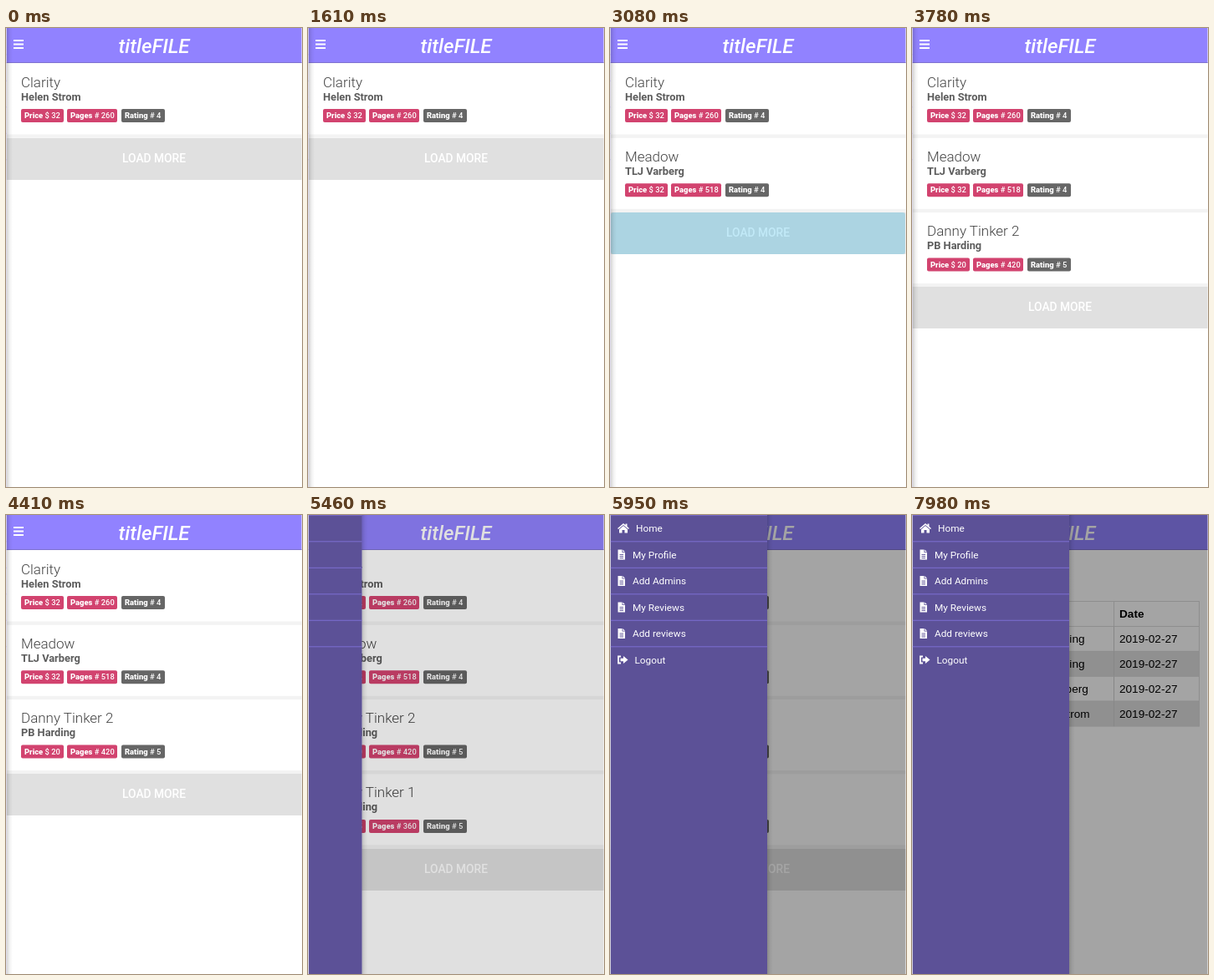
Animation of 354 by 550 pixels, one loop 8 s. Source, as an HTML page:

```html
<!DOCTYPE html>
<html lang="en">
<head>
<meta charset="utf-8">
<title>Book list</title>
<style>
  html, body { margin: 0; width: 100%; height: 100%; overflow: hidden; background: #fff; }
  svg { display: block; font-family: Roboto, sans-serif; }
  .brand { font: italic 500 24px Roboto, sans-serif; fill: #fff; text-anchor: middle; }
  .title { font-size: 17px; font-weight: 300; fill: #444; }
  .author { font-size: 12.8px; font-weight: 700; fill: #5c5c5c; }
  .badge { font-size: 9.4px; font-weight: 500; fill: #fff; }
  .badge tspan { font-weight: 800; }
  .more { font-size: 13.8px; font-weight: 500; fill: #fff; text-anchor: middle; }
  .table { font: 13.6px "Liberation Sans", Arial, sans-serif; }
  .table .head { font-weight: 700; }
  .nav text { font-size: 11.8px; fill: #fff; }
</style>
</head>
<body>
<svg width="354" height="550" viewBox="0 0 354 550">
  <defs>
    <clipPath id="screen"><path d="M.8 0H353.5V550H.8z"/></clipPath>
    <linearGradient id="shade">
      <stop offset="0" stop-opacity=".16"/>
      <stop offset=".5" stop-opacity=".05"/>
      <stop offset="1" stop-opacity="0"/>
    </linearGradient>
  </defs>
  <g clip-path="url(#screen)">
    <g id="shelf">
      <g id="cards"></g>
      <g id="button">
        <rect width="354" height="50" fill="#e0e0e0"/>
        <text class="more" x="177" y="29">LOAD MORE</text>
        <rect id="tap" x="1" width="352" height="50" rx="3" fill="#33b5e5"/>
      </g>
    </g>
    <g id="reviews" class="table">
      <path d="M130 103.5H344M130 133.5H344M241.5 103V134M343.5 103V134" stroke="#dcdcdc" fill="none"/>
      <text class="head" x="137" y="123">Author</text>
      <text class="head" x="248" y="123">Date</text>
      <g id="rows"></g>
    </g>
    <path d="M0 0H354V42H0z" fill="#9182ff"/>
    <path d="M0 41.5H354" stroke="#7f73cf"/>
    <path d="M9 15H21M9 19.5H21M9 24H21" stroke="#fff" stroke-width="2"/>
    <text class="brand" x="177" y="30">titleFILE</text>
    <rect id="dim" width="354" height="550"/>
    <g id="nav" class="nav">
      <path d="M188 0H195V550H188z" fill="url(#shade)"/>
      <path d="M0 0H188V550H0z" fill="#5c5197"/>
    </g>
  </g>
</svg>
<script>
const LOOP = 8000, PITCH = 89.3, NAV_WIDTH = 187;
const TAPS = [1680, 3080, 4200], LOADS = [2100, 3360, 4620];
const NAV_OPEN = 5397, NAV_TIME = 300, PAGE_AT = 6300, ROWS_AT = 7070;

const el = id => document.getElementById(id);
const clamp = v => Math.min(1, Math.max(0, v));
const show = (node, on) => node.setAttribute('visibility', on ? 'visible' : 'hidden');

const books = [
  ['Clarity', 'Helen Strom', 32, 260, 4],
  ['Meadow', 'TLJ Varberg', 32, 518, 4],
  ['Danny Tinker 2', 'PB Harding', 20, 420, 5],
  ['Danny Tinker 1', 'PB Harding', 25, 360, 5],
];

const badge = (x, width, fill, label, value) =>
  `<rect x="${x}" y="54.5" width="${width}" height="16" rx="2" fill="${fill}"/>
   <text class="badge" x="${x + 4}" y="65.6"><tspan>${label}</tspan> ${value}</text>`;

el('cards').innerHTML = books.map(([title, author, price, pages, rating], i) =>
  `<g transform="translate(0 ${42.5 + i * PITCH})">
    <rect y="85" width="354" height="4.3" fill="#f3f3f3"/>
    <text class="title" x="18" y="28">${title}</text>
    <text class="author" x="18" y="44">${author}</text>
    ${badge(18, 51, '#d2436f', 'Price', '$ ' + price)}
    ${badge(73, 60, '#d2436f', 'Pages', '# ' + pages)}
    ${badge(138, 52, '#666', 'Rating', '# ' + rating)}
  </g>`).join('');

el('rows').innerHTML = [3, 2, 1, 0].map((book, i) => {
  const y = 133.5 + i * 29.9;
  return `<rect x="120" y="${y}" width="223.5" height="29.9" stroke="#dcdcdc" fill="${i % 2 ? '#dfdfdf' : '#fff'}"/>
    <path d="M241.5 ${y}v29.9" stroke="#d2d2d2"/>
    <text x="137" y="${y + 19.5}">${books[book][1]}</text>
    <text x="248" y="${y + 19.5}">2019-02-27</text>`;
}).join('');

// Icons are centred vertically on y = 0
const home = '<path d="M9 0L16 -6L18.5 -3.9V-5.5H20.5V-2.2L23 0L22 1L16 -4L10 1zM11 1.2L16 -2.9L21 1.2V5.5H17.5V2H14.5V5.5H11z" fill="#fff"/>';
const file = '<path d="M9.5 -6H14.5V-2.5H18V6H9.5zM15.3 -6L18 -3.3H15.3z" fill="#fff"/><path d="M11.5 0H16M11.5 2H16M11.5 4H16" stroke="#5c5197" stroke-width=".9"/>';
const exit = '<path d="M13 -4H10V4H13" fill="none" stroke="#fff" stroke-width="1.8"/><path d="M12.5 -1.7H16V-4.5L21.5 0L16 4.5V1.7H12.5z" fill="#fff"/>';
const menu = [
  [home, 31, 'Home'], [file, 27, 'My Profile'], [file, 27, 'Add Admins'],
  [file, 27, 'My Reviews'], [file, 27, 'Add reviews'], [exit, 29.5, 'Logout'],
];
el('nav').innerHTML += menu.map(([icon, x, label], i) =>
  `<g transform="translate(0 ${16 + i * 31.5})">
    <path d="M0 -15.7H188" stroke="#7c6ed2"/>${icon}
    <text x="${x}" y="4.3">${label}</text>
  </g>`).join('');

function draw(t) {
  const count = 1 + LOADS.filter(at => t >= at).length;
  [...el('cards').children].forEach((card, i) => card.setAttribute('display', i < count ? 'inline' : 'none'));
  el('button').setAttribute('transform', `translate(0 ${Math.round(42.5 + count * PITCH)})`);

  const glow = Math.max(...TAPS.map(at => t < at ? 0 : clamp((at + 210 - t) / 70)));
  el('tap').setAttribute('opacity', 0.3 * glow);

  const open = 1 - (1 - clamp((t - NAV_OPEN) / NAV_TIME)) ** 1.73;
  el('nav').setAttribute('transform', `translate(${(open - 1) * NAV_WIDTH} 0)`);
  el('dim').setAttribute('opacity', 0.355 * open);

  show(el('shelf'), t < PAGE_AT);
  show(el('reviews'), t >= PAGE_AT);
  show(el('rows'), t >= ROWS_AT);
}

function tick() {
  draw(performance.now() % LOOP);
  requestAnimationFrame(tick);
}
tick();
</script>
</body>
</html>
```
